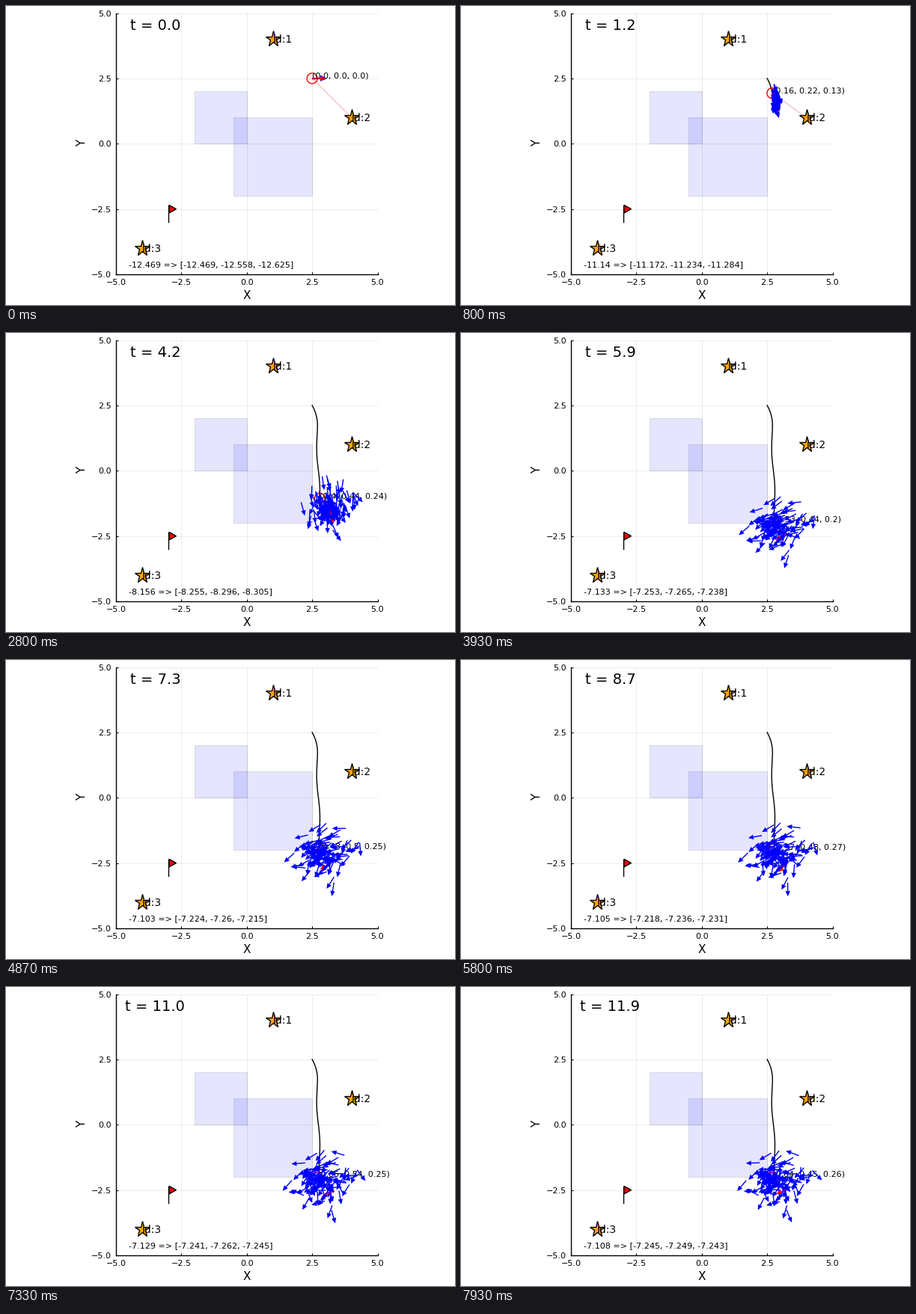
Recreate the animation shown at these times as a matplotlib script. Size 600 by 400 pixels, loop 8 s.

```python
import numpy as np
import matplotlib.pyplot as plt
from matplotlib.animation import FuncAnimation
from matplotlib.patches import Circle, Polygon, Rectangle

plt.rcParams["font.family"] = "DejaVu Sans"

FRAMES, STEP = 120, 66.6
W, H, DPI = 600, 400, 100
STARS = [(1, 4), (4, 1), (-4, -4)]
VIEW_RANGE, VIEW_ANGLE = 6, 60
TURN_END, DRIVE_END, SWING_END = 6, 51, 58
ARROW = 0.53
N, BACK = 100, 70

rng = np.random.default_rng(11)
t = np.arange(FRAMES)


def ramp(start, end):
    """0 before start, 1 after end, linear between."""
    return np.clip((t - start) / (end - start), 0, 1)


def settle(rate):
    return 1 - np.exp(-np.maximum(t, 0) / rate)


def unit(deg):
    a = np.radians(deg)
    return np.column_stack([np.cos(a), np.sin(a)])


# Robot: turn on the spot, drive down with a slight weave, turn, then creep.
driving = (t >= TURN_END) & (t < DRIVE_END)
facing = (-62 * ramp(0, TURN_END) - 26 * ramp(TURN_END, 13)
          - 67 * ramp(DRIVE_END, SWING_END))
weave = 5 * np.sin((t - 24) / 13 * np.pi) * (driving & (t > 13))
speed = 0.1 * driving + 0.0027 * ((t >= 73) & (t < 101))
moves = speed[:, None] * unit(facing + weave)
robot = np.array([2.5, 2.5]) + np.cumsum(moves, axis=0) - moves

# Particle cloud: lags to the lower right of the robot and widens.
lag = ramp(TURN_END, 24)
center = robot + lag[:, None] * np.array([0.28, -0.16])
spread = np.column_stack([0.41 * ramp(8, DRIVE_END),
                          0.38 * (1 - np.exp(-np.maximum(t - 6, 0) / 14))])
heading = facing + 7 * lag
fan = 0.4 * t
z = np.clip(0.85 * rng.standard_t(5, size=(N, 3)), -3, 3)
drift = np.cumsum(rng.normal(scale=.004, size=(FRAMES, N, 2)), axis=0)

# Readings: estimate error settles, action values climb; both flicker.
live = (t > 0)[:, None]
error = np.column_stack([0.68 * settle(45), 0.5 * settle(20),
                         0.25 * settle(15)])
error = np.abs(error + rng.normal(scale=.03, size=error.shape)
               * ramp(0, 20)[:, None])
guess = robot + error[:, :2] * np.array([1, -1])
guess_dir = heading + rng.normal(scale=12, size=FRAMES) * lag

climb = -7.1 - 5.369 * (1 - ramp(0, 59)) ** 1.3
gap = np.array([0, 0, -.089, -.156])
late_gap = np.array([0, -.125, -.14, -.125])
mix = ramp(0, 59)[:, None]
value = climb[:, None] + gap * (1 - mix) + late_gap * mix
value += live * (rng.normal(scale=.02, size=(FRAMES, 1))
                 + rng.normal(scale=.008, size=(FRAMES, 4)))


fig = plt.figure(figsize=(W / DPI, H / DPI), dpi=DPI, facecolor="white")
ax = fig.add_axes([147 / W, 41 / H, 349.5 / W, 349.5 / H])
ax.set(xlim=(-5, 5), ylim=(-5, 5))
ticks = np.arange(-5, 5.1, 2.5)
labels = [f"{v:.1f}".replace("-", "\u2212") for v in ticks]
ax.set_xticks(ticks, labels)
ax.set_yticks(ticks, labels)
ax.tick_params(direction="in", length=2.5, width=.8, labelsize=8, pad=4.4)
ax.spines[["top", "right"]].set_visible(False)
ax.spines[["left", "bottom"]].set_linewidth(1)
ax.set_axisbelow(True)
ax.grid(color="black", alpha=.08, lw=.7)
fig.text(322 / W, 1 - 392.5 / H, "X", size=11, ha="center")
fig.text(106 / W, 1 - 183.5 / H, "Y", size=11, ha="center", va="baseline",
         rotation=90, rotation_mode="anchor")

for x, y, side in [(-2, 0, 2), (-.5, -2, 3)]:
    ax.add_patch(Rectangle((x, y), side, side, fc=(0, 0, 1, .1),
                           ec=(0, 0, 0, .1), lw=.8, zorder=2))
ax.plot([-3, -3], [-3, -2.36], color="black", lw=1, zorder=3)
ax.add_patch(Polygon([(-2.97, -2.35), (-2.70, -2.5), (-2.97, -2.65)],
                     fc="red", ec="black", lw=1, zorder=3))
for k, (x, y) in enumerate(STARS, 1):
    ax.plot(x, y, "*", ms=15.2, mfc="orange", mec="black", mew=1, zorder=4)
    ax.text(x, y - .13, f"id:{k}", size=10, zorder=4.1)

clock = ax.text(-3.5, 4.36, "", size=14, ha="center")
scores = ax.text(-4.5, -4.72, "", size=8)
reading = ax.text(0, 0, "", size=8, zorder=5)
trail, = ax.plot([], [], color="black", lw=1, zorder=4.2)
body = ax.add_patch(Circle((0, 0), .2, fill=False, ec="red", lw=1, zorder=4.4))
nose, = ax.plot([], [], color="red", lw=1, zorder=4.4)
sights = [ax.plot([], [], color="crimson", alpha=.25, lw=1, zorder=4.3)[0]
          for _ in STARS]


def arrows(n, color, zorder):
    zero = np.zeros(n)
    return ax.quiver(zero, zero, zero + ARROW, zero, color=color,
                     scale_units="xy", scale=1, units="dots", width=1.4,
                     headwidth=4.6, headlength=5, headaxislength=5,
                     zorder=zorder)


def aim(quiver, pos, deg):
    quiver.set_offsets(pos)
    quiver.set_UVC(*(ARROW * unit(deg)).T)


back = arrows(BACK, "blue", 6)
best = arrows(1, "red", 7)
front = arrows(N - BACK, "blue", 8)


def listing(numbers, digits):
    return ", ".join(str(round(float(v), digits)) for v in numbers)


def in_view(pos, deg, star):
    dx, dy = np.subtract(star, pos)
    bearing = (np.degrees(np.arctan2(dy, dx)) - deg + 180) % 360 - 180
    return bool(np.hypot(dx, dy) <= VIEW_RANGE and abs(bearing) <= VIEW_ANGLE)


def draw(i):
    x, y = robot[i]
    clock.set_text(f"t = {i / 10:.1f}")
    scores.set_text(f"{listing(value[i, :1], 3)} => "
                    f"[{listing(value[i, 1:], 3)}]")
    reading.set_position((x, y))
    reading.set_text(f"({listing(error[i], 2)})")

    trail.set_data(*robot[:i + 1].T)
    body.center = (x, y)
    u, v = unit(facing[i])[0]
    nose.set_data([x, x + .2 * u], [y, y + .2 * v])
    for line, star in zip(sights, STARS):
        line.set_data([x, star[0]], [y, star[1]])
        line.set_visible(in_view((x, y), facing[i], star))

    pos = center[i] + spread[i] * z[:, :2] + lag[i] * drift[i]
    deg = heading[i] + fan[i] * z[:, 2]
    aim(back, pos[:BACK], deg[:BACK])
    aim(front, pos[BACK:], deg[BACK:])
    aim(best, guess[i:i + 1], guess_dir[i:i + 1])
    best.set_zorder(9 if i <= TURN_END else 7)
    return [clock, scores, reading, trail, body, nose, *sights,
            back, best, front]


anim = FuncAnimation(fig, draw, frames=FRAMES, interval=STEP,
                     init_func=lambda: draw(0), repeat=True, repeat_delay=0,
                     blit=False)
plt.show()
```
